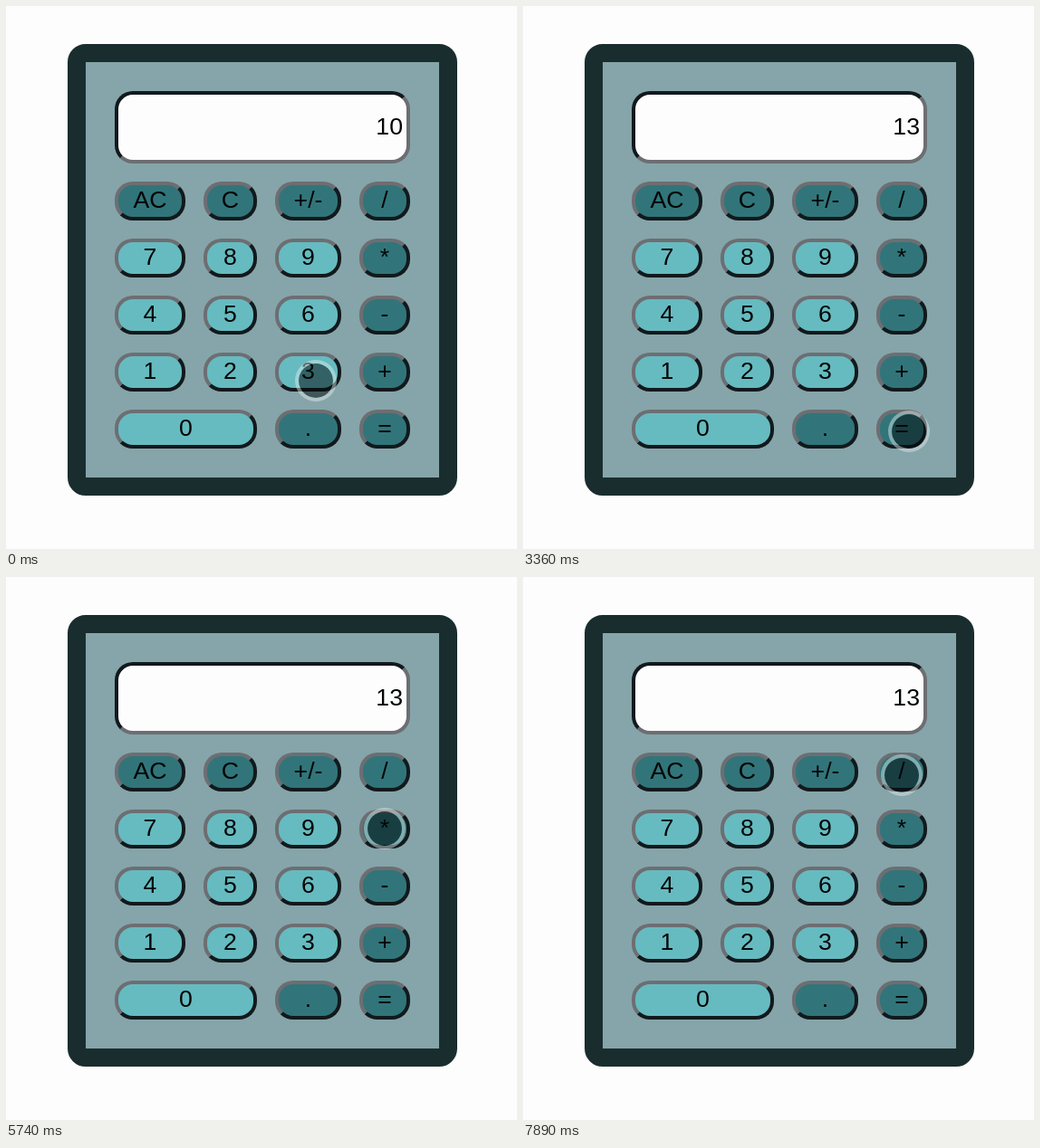
An HTML page that plays this animation: 564 px wide and 600 px high, repeating every 7.99 s.

```html
<!DOCTYPE html>
<html lang="en">
<head>
<meta charset="utf-8">
<title>Calculator</title>
<style>
  html, body { margin: 0; width: 100%; height: 100%; overflow: hidden; background: #fdfdfd; }
  div { box-sizing: border-box; }
  #calculator {
    position: absolute; left: 68px; top: 42px; width: 430px; height: 499px; padding: 32px;
    display: grid; gap: 20px;
    grid-template: 80px repeat(5, 43px) / 78px 59px 73px 56px;
    font: 26.67px "Liberation Sans", Arial, sans-serif; color: #030606;
    background: #85a5aa; border: 20px solid #1a2d2e; border-radius: 20px;
  }
  #display, .key { --light: #6d6e72; --shade: #12191c; border: 4px solid; border-radius: 20px; }
  #display {
    grid-column: span 4; line-height: 70px; padding-right: 4px; text-align: right;
    background: #fdfdfd; border-color: var(--shade) var(--light) var(--light) var(--shade);
  }
  .key {
    line-height: 33px; text-align: center; background: #31757a;
    border-color: var(--light) var(--shade) var(--shade) var(--light);
  }
  .digit { background: #66bbc0; }
  .wide { grid-column: span 2; }
  #cursor {
    position: absolute; left: -23px; top: -23px; width: 46px; height: 46px;
    border: 4px solid rgba(230, 240, 240, .45); border-radius: 50%;
    background: rgba(0, 8, 10, .5); background-clip: padding-box;
  }
</style>
</head>
<body>
<div id="calculator"><div id="display"></div></div>
<div id="cursor"></div>
<script>
const LOOP = 7990;
const calculator = document.getElementById('calculator');
const display = document.getElementById('display');
const cursor = document.getElementById('cursor');

for (const label of 'AC C +/- / 7 8 9 * 4 5 6 - 1 2 3 + 0 . ='.split(' ')) {
  const key = document.createElement('div');
  key.className = 'key';
  key.classList.toggle('digit', /\d/.test(label));
  key.classList.toggle('wide', label === '0');
  key.textContent = label;
  calculator.append(key);
}

const start = { x: 342, y: 414 };
const moves = [
  { from: 500, to: 1100, x: 435, y: 464 },
  { from: 1300, to: 2700, x: 426, y: 470 },
  { from: 3900, to: 4780, x: 449, y: 278, bulge: 14.5 },
  { from: 5100, to: 5700, x: 418, y: 278 },
  { from: 6900, to: 7700, x: 418, y: 219 }
];

function cursorAt(t) {
  let { x, y } = start;
  for (const move of moves) {
    const u = Math.min(1, Math.max(0, (t - move.from) / (move.to - move.from)));
    const eased = u * u * (3 - 2 * u);
    x += (move.x - x) * eased + (move.bulge || 0) * Math.sin(Math.PI * eased);
    y += (move.y - y) * eased;
  }
  return { x, y };
}

function draw() {
  const t = performance.now() % LOOP;
  const { x, y } = cursorAt(t);
  display.textContent = t < 300 ? '10' : t < 2200 ? '3' : '13';
  cursor.style.transform = `translate(${x}px, ${y}px)`;
  requestAnimationFrame(draw);
}
draw();
</script>
</body>
</html>
```
